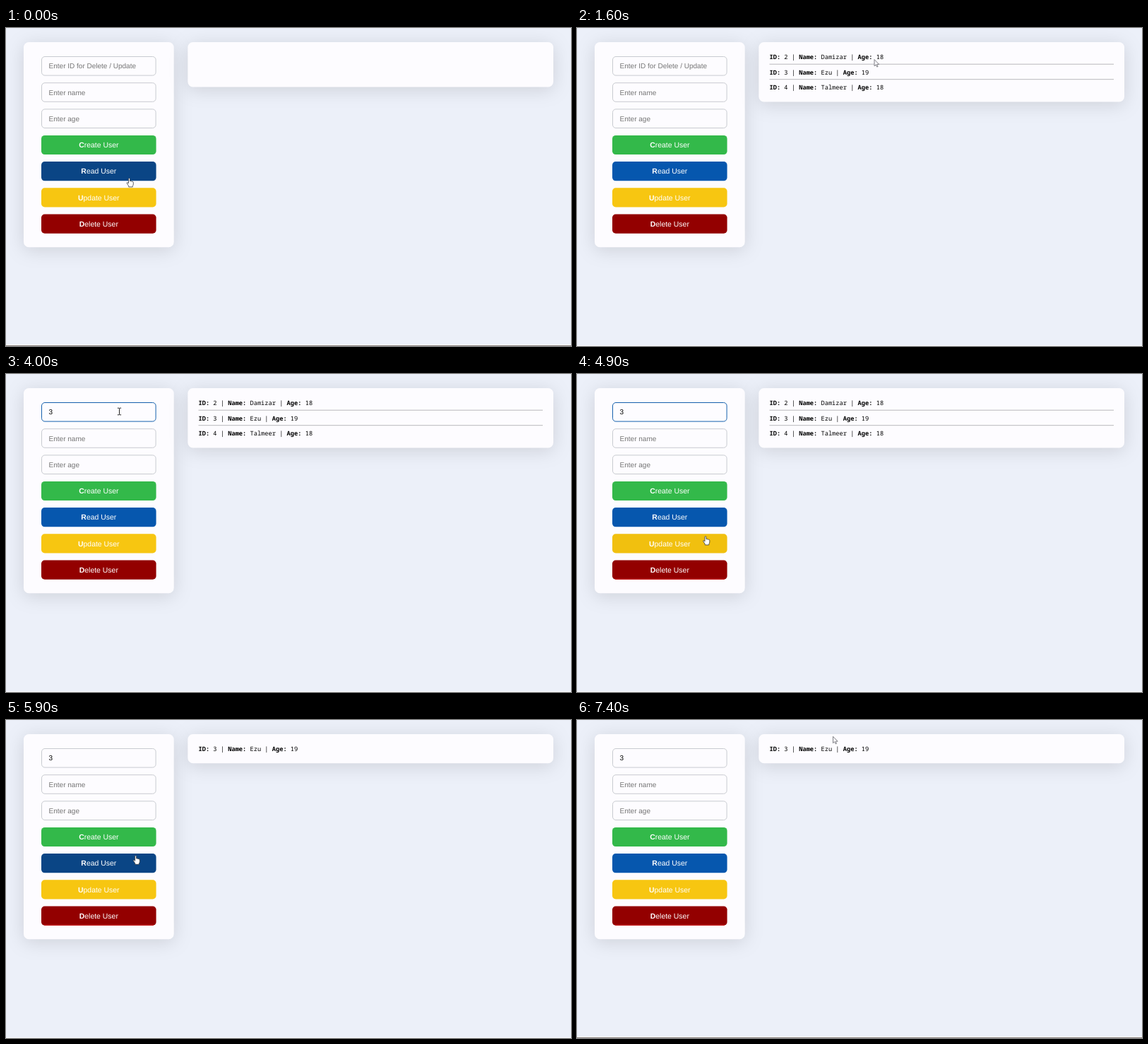
An HTML page that plays this animation: 800x450 px, repeating every 7.5 s.

```html
<!DOCTYPE html>
<html lang="en">
<head>
<meta charset="utf-8">
<title>User form</title>
<style>
  html, body { margin: 0; width: 100%; height: 100%; overflow: hidden; background: #ecf0f9; }
  svg { display: block; width: 800px; height: 450px; text-rendering: geometricPrecision; }
  text { font-family: "Liberation Sans", Arial, sans-serif; white-space: pre; }
  .card { fill: #fdfcff; filter: drop-shadow(0 4px 13px rgba(0, 0, 0, .13)); }
  .field text { font-size: 10px; }
  .field rect { fill: #fdfcff; }
  .button text { font-size: 10.45px; fill: #fff; text-anchor: middle; }
  .row text { font: 8.7px "Noto Sans Mono", "DejaVu Sans Mono", monospace; }
  .bold { font-weight: bold; }
</style>
</head>
<body>
<svg id="stage" viewBox="0 0 800 450">
  <rect width="800" height="450" fill="#ecf0f9"/>
  <rect class="card" x="25" y="20" width="212.7" height="290.3" rx="7.5"/>
  <rect class="card" id="panel" x="257.4" y="20" width="517.6" height="63.5" rx="7.5"/>
  <g id="rows"></g>
  <g id="form"></g>
  <path id="redEdge" d="M54 290.2H209" stroke="#e00a0a" stroke-width=".8"/>
  <path id="caret" d="M0 48.5V59" stroke="#000" stroke-width=".8"/>
  <g id="popup">
    <path d="M118.5 73.5L124.8 68.8L131 73.5Z" fill="#171b1f"/>
    <rect x="111.5" y="73" width="98.7" height="28.2" rx="4.5" fill="#171b1f"/>
    <text x="118.6" y="90.3" font-size="8.2" fill="#fff">1</text>
  </g>
  <rect id="strip" y="449" width="800" height="1" fill="#fbfbfd"/>
  <g id="edge">
    <rect y="448" width="800" height="1" fill="#f9f9fb"/>
    <rect y="449" width="800" height="1" fill="#8b8280"/>
  </g>
  <g id="pointer" stroke-linejoin="round">
    <path id="arrow" d="M0 0V9.4L2.2 7.4L3.7 10.6L5.1 10L3.7 6.9H6.7Z" fill="#f6f5f8" stroke="#66666c" stroke-width=".8"/>
    <path id="hand" d="M-1 .8Q0-.6 1 .8V4.2Q2 3.5 2.7 4.5Q3.7 3.9 4.3 4.9Q5.6 4.6 5.8 6V8.4Q5.7 10 4.8 11V12.4H-.8V11L-3.2 7.4Q-3.6 5.9-2.2 6.2L-1 7.4Z" fill="#fff" stroke="#33363c" stroke-width=".8"/>
    <path id="beam" d="M-2.6-4.8H-1Q0-4.8 0-3.8Q0-4.8 1-4.8H2.6M0-3.8V3.8M-2.6 4.8H-1Q0 4.8 0 3.8Q0 4.8 1 4.8H2.6" fill="none" stroke="#222" stroke-width="1"/>
  </g>
</svg>
<script>
const LOOP = 7500, STEP = 100;
const LEFT = 50, WIDTH = 162.6, HEIGHT = 27.2, TOP = 40.3, PITCH = 37.2;
const $ = id => document.getElementById(id);

function add(parent, tag, attrs, text) {
  const node = document.createElementNS("http://www.w3.org/2000/svg", tag);
  for (const key in attrs) node.setAttribute(key, attrs[key]);
  if (text !== undefined) node.textContent = text;
  return parent.appendChild(node);
}
const show = (node, on) => node.setAttribute("visibility", on ? "visible" : "hidden");
const within = (t, from, to) => t >= from && t < to;

const fields = ["Enter ID for Delete / Update", "Enter name", "Enter age"].map((hint, i) => {
  const y = TOP + i * PITCH, g = add($("form"), "g", { class: "field" });
  const box = add(g, "rect", { x: LEFT + .5, y: y + .2, width: WIDTH - 1, height: HEIGHT - .6, rx: 4.5, "stroke-width": 1, stroke: "#c8cbd0" });
  const label = add(g, "text", { x: 60.6, y: y + 17, fill: "#757575" }, hint);
  return { box, label, hint };
});

const buttons = [
  ["Create", "#33b94a", "#2ca541"],
  ["Read", "#0657ae", "#0a4585"],
  ["Update", "#f7c611", "#f1c00f"],
  ["Delete", "#930000", "#7c0000"]
].map(([verb, color, hover], i) => {
  const y = TOP + (i + 3) * PITCH, g = add($("form"), "g", { class: "button" });
  const box = add(g, "rect", { x: LEFT, y, width: WIDTH, height: HEIGHT, rx: 4.8, fill: color });
  const label = add(g, "text", { x: 131.3, y: y + 17.2 });
  add(label, "tspan", { class: "bold" }, verb[0]);
  add(label, "tspan", {}, verb.slice(1) + " User");
  return { box, color, hover };
});

const users = [[2, "Damizar", 18], [3, "Ezu", 19], [4, "Talmeer", 18]];
const rows = users.map(([id, name, age], i) => {
  const g = add($("rows"), "g", { class: "row" });
  const label = add(g, "text", { x: 272.5, y: 44 + i * 21.7 });
  [["ID:", ` ${id} | `], ["Name:", ` ${name} | `], ["Age:", ` ${age}`]].forEach(([key, value]) => {
    add(label, "tspan", { class: "bold" }, key);
    add(label, "tspan", {}, value);
  });
  const rule = i < 2 ? add(g, "path", { d: `M272.5 ${51.2 + i * 21.5}H760`, stroke: "#b9b9bc" }) : null;
  return { g, label, rule };
});

// Pointer hot spot: time, x, y
const route = [
  [0, 174.5, 212.5], [800, 174.5, 212.5], [1500, 421, 44.5], [1700, 421, 44.5],
  [2400, 160.5, 53], [4000, 160.5, 53], [4600, 188, 273], [4900, 182, 229.5],
  [5400, 169.5, 204.8], [5800, 169.5, 204.8], [6400, 360, 31], [6800, 362.5, 23.3], [LOOP, 362.5, 23.3]
];

function pointerAt(t) {
  const i = route.findIndex(stop => stop[0] > t);
  const [t0, x0, y0] = route[i - 1], [t1, x1, y1] = route[i];
  const p = (t - t0) / (t1 - t0), e = p * p * (3 - 2 * p);
  return [x0 + (x1 - x0) * e, y0 + (y1 - y0) * e];
}

function itemUnder(x, y) {
  if (x < LEFT || x > LEFT + WIDTH) return -1;
  const i = Math.floor((y - TOP) / PITCH);
  return i >= 0 && i < 7 && y - TOP - i * PITCH < HEIGHT ? i : -1;
}

function render(t) {
  const [x, y] = pointerAt(t), over = itemUnder(x, y);
  $("pointer").setAttribute("transform", `translate(${x} ${y})`);
  show($("arrow"), over < 0);
  show($("beam"), over >= 0 && over < 3);
  show($("hand"), over >= 3);
  buttons.forEach((b, i) => b.box.setAttribute("fill", over === i + 3 ? b.hover : b.color));

  const focused = within(t, 2500, 5700), typed = t >= 3400;
  const idField = fields[0];
  idField.box.setAttribute("stroke", focused ? "#1560ad" : "#c8cbd0");
  idField.label.textContent = typed ? "3" : idField.hint;
  idField.label.setAttribute("fill", typed ? "#000" : "#757575");
  const blink = (t - (typed ? 3400 : 2500)) % 1000 < 500;
  show($("caret"), focused && blink);
  $("caret").setAttribute("transform", `translate(${typed ? 66.8 : 60.8} 0)`);
  show($("popup"), within(t, 2600, 3400));

  const all = within(t, 400, 5700), single = t >= 5700;
  $("panel").setAttribute("height", single ? 41.2 : all ? 84.5 : 63.5);
  rows.forEach((row, i) => {
    show(row.g, all || (single && i === 1));
    row.label.setAttribute("y", single ? 44 : 44 + i * 21.7);
    if (row.rule) show(row.rule, all);
  });

  show($("redEdge"), t >= 4700);
  const edge = t < 100 || t >= 7400;
  show($("edge"), edge);
  show($("strip"), !edge);
}

function frame() {
  render(Math.floor(performance.now() % LOOP / STEP) * STEP);
  requestAnimationFrame(frame);
}
frame();
</script>
</body>
</html>
```
